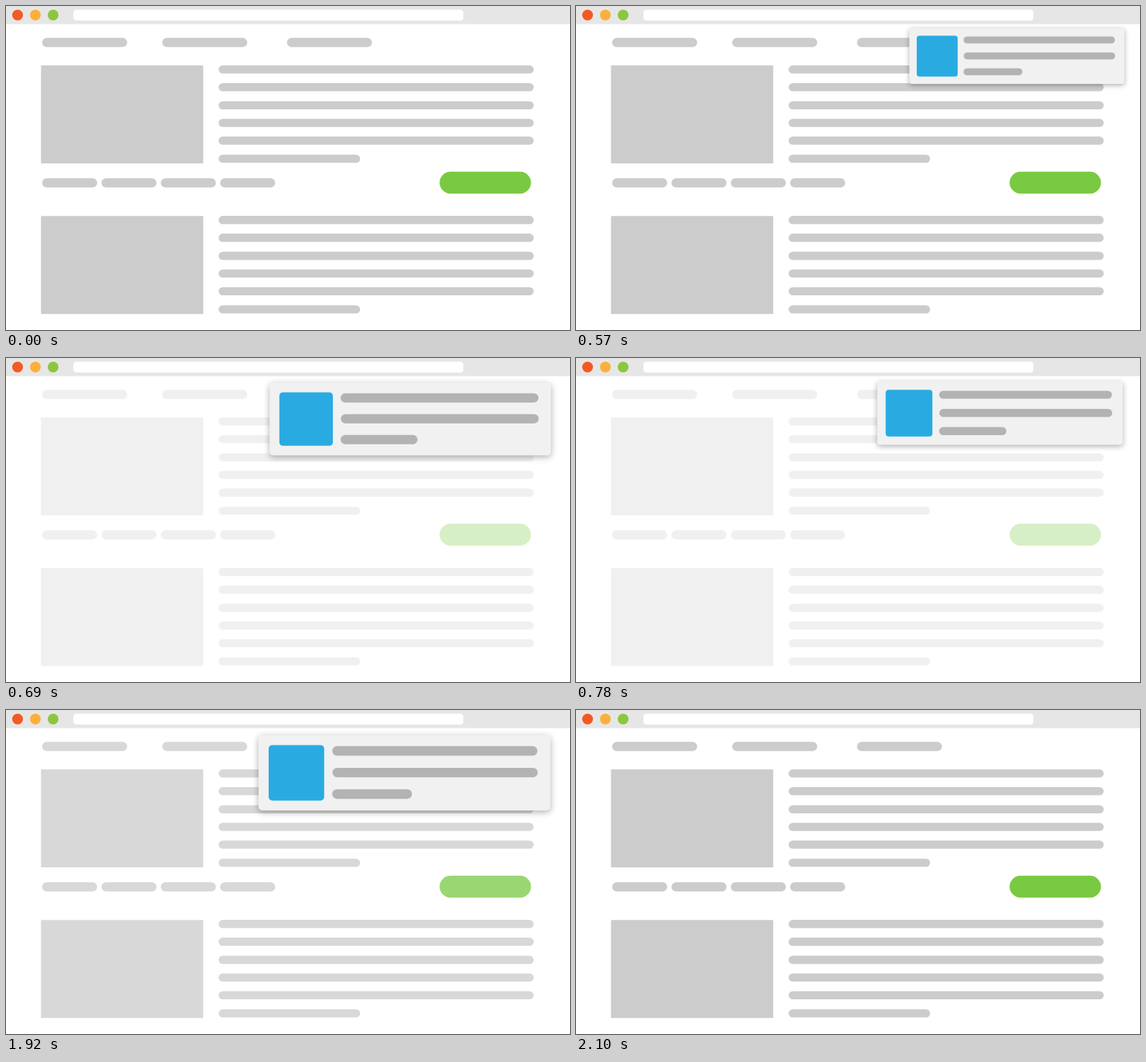
An HTML page with a canvas for the animation above (2.7 s loop, 730 px wide and 420 px high).

```html
<!DOCTYPE html>
<html lang="en">
<head>
<meta charset="utf-8">
<title>Page notification</title>
<style>
html, body { margin: 0; width: 100%; height: 100%; overflow: hidden; background: #fff; }
canvas { display: block; }
</style>
</head>
<body>
<canvas id="stage" width="730" height="420"></canvas>
<script>
const ctx = document.getElementById('stage').getContext('2d');
const LOOP = 2700, STEP = 30;
const PIVOT = { x: 724.6, y: 18.7 };
const GREY = '#ccc';

// [time, value] keys, eased in and out between neighbours
const SCALE = [[455, 0], [632, 1.22], [780, 1], [1795, 1], [1947, 1.205], [2098, 0]];
const FADE = [[570, 1], [690, 0.3], [1830, 0.3], [1980, 1]];

function valueAt(keys, t) {
  if (t <= keys[0][0]) return keys[0][1];
  for (let i = 1; i < keys.length; i++) {
    const [t0, v0] = keys[i - 1], [t1, v1] = keys[i];
    if (t < t1) {
      const p = (t - t0) / (t1 - t0);
      return v0 + (v1 - v0) * p * p * (3 - 2 * p);
    }
  }
  return keys[keys.length - 1][1];
}

function box(x, y, w, h, r, color) {
  ctx.fillStyle = color;
  ctx.beginPath();
  ctx.roundRect(x, y, w, h, r);
  ctx.fill();
}

function bar(x, middle, w, h, color) {
  box(x, middle - h / 2, w, h, h / 2, color);
}

function article(top) {
  box(45.3, top, 210, 127, 0, GREY);
  [5.2, 28.2, 51.7, 74.5, 97.5, 121].forEach((y, i) =>
    bar(275.2, top + y, i < 5 ? 407.8 : 183.2, 10.6, GREY));
}

function page(opacity) {
  ctx.globalAlpha = opacity;
  for (const x of [46.8, 202.2, 363.7]) bar(x, 47.2, 110, 12, GREY);
  article(77);
  for (let i = 0; i < 4; i++) bar(46.8 + i * 76.8, 229.2, 71.2, 12, GREY);
  bar(561.2, 229, 118.3, 28.6, '#7ac943');
  article(272.2);
  ctx.globalAlpha = 1;
}

function popup(scale) {
  if (scale <= 0) return;
  ctx.save();
  ctx.translate(PIVOT.x, PIVOT.y);
  ctx.scale(scale, scale);
  ctx.translate(-PIVOT.x, -PIVOT.y);
  ctx.shadowColor = 'rgba(0,0,0,0.32)';
  ctx.shadowBlur = 7 * scale;
  ctx.shadowOffsetY = 2 * scale;
  box(389.8, 30.3, 318, 82.3, 4, '#f1f1f1');
  ctx.shadowColor = 'transparent';
  box(400.8, 41.2, 60.5, 60.6, 4, '#29abe2');
  bar(470, 47.6, 223.7, 10.4, '#b3b3b3');
  bar(470.3, 71.2, 223.7, 10.4, '#b3b3b3');
  bar(470, 94.7, 87, 10.4, '#b3b3b3');
  ctx.restore();
}

function toolbar() {
  box(0, 0, 730, 23.5, 0, '#e6e6e6');
  ['#f15a24', '#fbb03b', '#8cc63f'].forEach((color, i) => bar(8 + 23 * i, 11.7, 14, 14, color));
  box(87.3, 4.7, 504.6, 14, 4, '#fff');
}

function draw(now) {
  const t = Math.floor((now % LOOP) / STEP) * STEP;
  ctx.clearRect(0, 0, 730, 420);
  page(valueAt(FADE, t));
  popup(valueAt(SCALE, t));
  toolbar();
  requestAnimationFrame(draw);
}

draw(performance.now());
</script>
</body>
</html>
```
